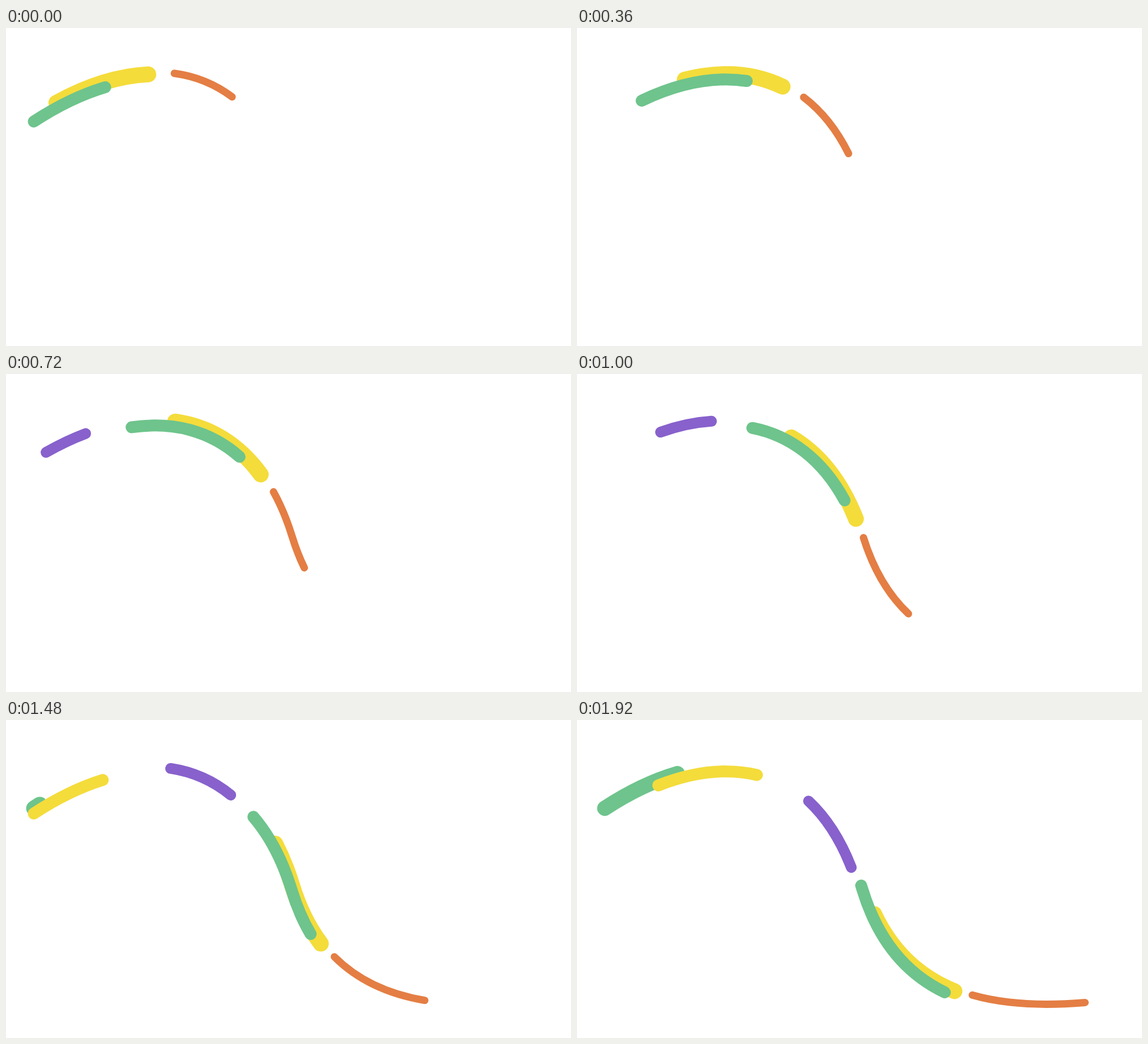
An HTML page for the animation above (1.96 s loop, 997 px wide and 561 px high).

```html
<!DOCTYPE html>
<html lang="en">
<head>
<meta charset="utf-8">
<title>Flowing strokes</title>
<style>
  html, body { margin: 0; width: 100%; height: 100%; overflow: hidden; background: #fff; }
  svg { display: block; width: 997px; height: 561px; }
  path { fill: none; stroke-linecap: round; }
</style>
</head>
<body>
<svg id="stage" viewBox="0 0 997 561"></svg>
<script>
const LOOP = 1960, STEP = 40;
const CURVE = 'M49 165C249 34 435 75 504 300C566 502 735 536 960 504';
const YELLOW = '#f4dc3b', GREEN = '#6ec48c', PURPLE = '#8861cc', ORANGE = '#e47e44';

// All strokes share one curve, shifted by dx, dy.
// head and tail: two moments and the x reached at each; a missing tail stays at the start.
const strokes = [
  { color: YELLOW, width: 28, dx: 0.5, dy: -9.3, head: [0, 251, 1920, 666], tail: [360, 190, 1680, 499] },
  { color: GREEN, width: 27, dx: 0, dy: -9.3, head: [1680, 111, 1920, 177] },
  { color: GREEN, width: 21, dx: 0, dy: 0, head: [0, 175, 1920, 649], tail: [360, 114, 1920, 501.5] },
  { color: YELLOW, width: 21, dx: 0, dy: 0, head: [1280, 108, 1920, 317.5], tail: [1680, 71, 1920, 143.5] },
  { color: PURPLE, width: 19, dx: -9, dy: -8, head: [720, 140.5, 1920, 484], tail: [720, 70.5, 1920, 408.5] },
  { color: ORANGE, width: 13, dx: 1, dy: -13, head: [0, 399, 1920, 896.5], tail: [0, 297, 1920, 697.5] }
];

const stage = document.getElementById('stage');

function lengthAtX(path, x) {
  let low = 0, high = path.getTotalLength();
  for (let i = 0; i < 24; i++) {
    const mid = (low + high) / 2;
    if (path.getPointAtLength(mid).x < x) low = mid; else high = mid;
  }
  return low;
}

// Constant speed along the curve, held at its beginning until the start time.
function travel(path, keys, dx) {
  if (!keys) return () => 0;
  const [t1, x1, t2, x2] = keys;
  const from = lengthAtX(path, x1 - dx), to = lengthAtX(path, x2 - dx);
  return t => Math.max(0, from + (to - from) * (t - t1) / (t2 - t1));
}

for (const s of strokes) {
  const path = document.createElementNS('http://www.w3.org/2000/svg', 'path');
  path.setAttribute('d', CURVE);
  path.setAttribute('stroke', s.color);
  path.setAttribute('stroke-width', s.width);
  path.setAttribute('transform', `translate(${s.dx} ${s.dy})`);
  stage.append(path);
  s.path = path;
  s.headAt = travel(path, s.head, s.dx);
  s.tailAt = travel(path, s.tail, s.dx);
}

function draw(t) {
  for (const { path, headAt, tailAt } of strokes) {
    const tail = tailAt(t), length = headAt(t) - tail;
    path.style.visibility = length > 0 ? 'visible' : 'hidden';
    path.style.strokeDasharray = `${Math.max(length, 0.01)} 4000`;
    path.style.strokeDashoffset = -tail;
  }
}

const begin = performance.now();
function tick() {
  const t = (performance.now() - begin) % LOOP;
  draw(Math.floor(t / STEP) * STEP);
  requestAnimationFrame(tick);
}
tick();
</script>
</body>
</html>
```
